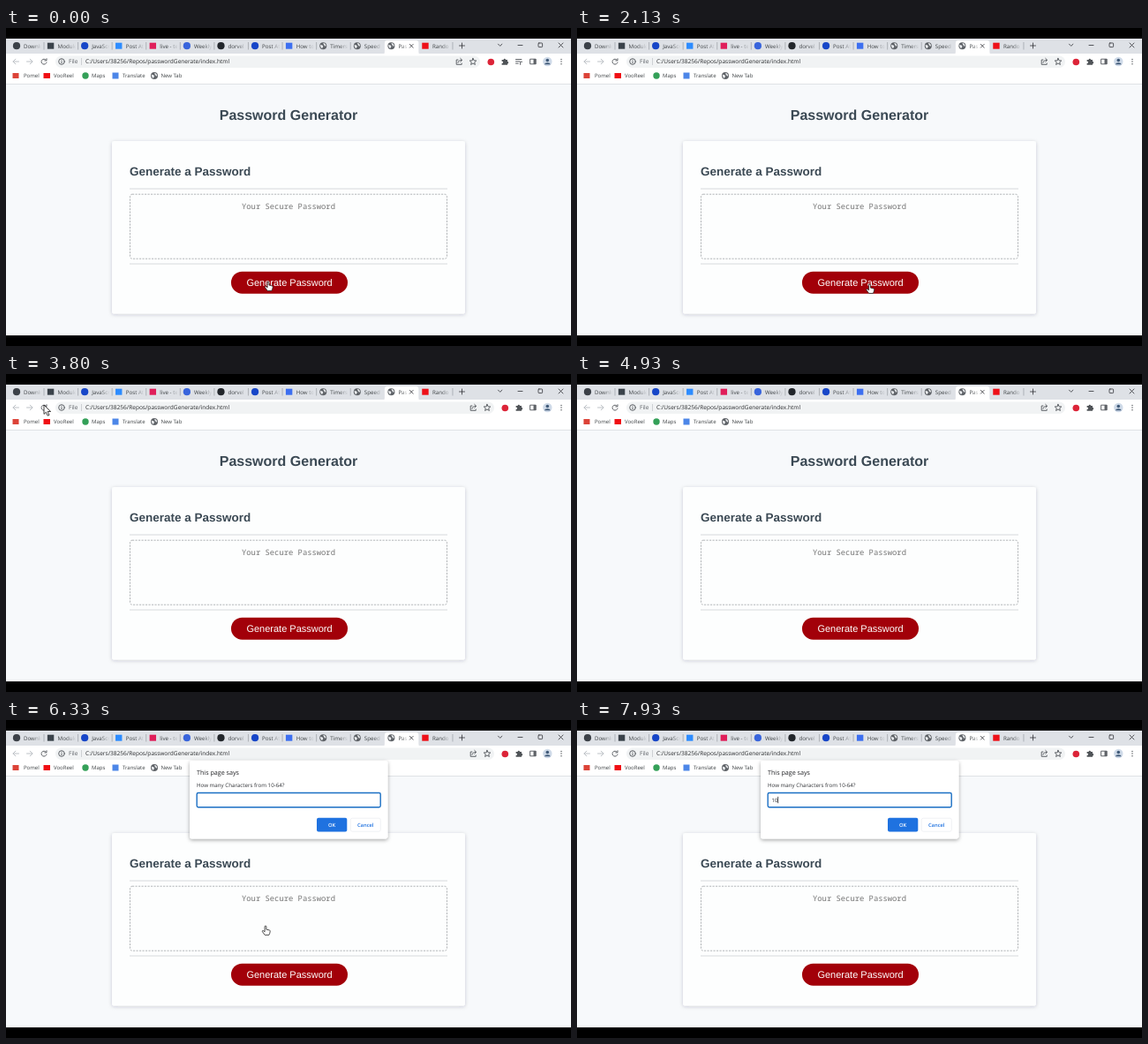
Recreate the animation shown at these times as an HTML page. Size 640 by 360 pixels, loop 8 s.

```html
<!DOCTYPE html>
<html lang="en">
<head>
<meta charset="utf-8">
<title>Password Generator</title>
<style>
  html, body { margin: 0; width: 100%; height: 100%; overflow: hidden; background: #000; }
  svg { display: block; width: 100vw; height: 100vh; }
  text { font-family: "Open Sans", "Noto Sans", sans-serif; font-size: 6.2px; fill: #3c4043; text-rendering: geometricPrecision; }
  .page { font-family: "Liberation Sans", Arial, sans-serif; fill: #3b4954; }
  .bold { font-weight: 700; }
  .mono { font-family: "Noto Sans Mono", monospace; font-size: 8.83px; fill: #757575; }
  .mid { text-anchor: middle; }
  .url { font-size: 6.55px; fill: #2a2c2f; }
  .mark { font-size: 6px; }
  .line { fill: none; stroke: #5f6368; stroke-width: 1; stroke-linecap: round; stroke-linejoin: round; }
  .pale { stroke: #bdc1c6; }
  .dark { stroke: #303236; stroke-width: .8; }
  .rule { stroke: #d6d9dc; }
</style>
</head>
<body>
<svg viewBox="0 0 640 360" preserveAspectRatio="none">
  <defs>
    <linearGradient id="fade">
      <stop offset="0" stop-color="#dee1e6" stop-opacity="0"/>
      <stop offset=".85" stop-color="#dee1e6"/>
    </linearGradient>
    <linearGradient id="fadeWhite">
      <stop offset="0" stop-color="#fff" stop-opacity="0"/>
      <stop offset="1" stop-color="#fff"/>
    </linearGradient>
    <filter id="soft" x="-10%" y="-10%" width="120%" height="125%">
      <feDropShadow dx="0" dy="1" stdDeviation="2" flood-color="#1e2a36" flood-opacity=".2"/>
    </filter>
    <filter id="deep" x="-10%" y="-15%" width="120%" height="140%">
      <feDropShadow dx="0" dy="1.5" stdDeviation="2.2" flood-opacity=".35"/>
    </filter>
    <g id="globe">
      <circle r="4" fill="#5f6368"/>
      <path d="M-3-1.4C-1.8-.2-.3-1 0 .2S-1.2 1.4-.9 3.1C-2.6 2.4-3.4.6-3-1.4M.4-3.1C-.3-1.8 1.2-1.6 1.4-.5S2.4.5 3.2.1C3.2-1.8 1.8-3 .4-3.1" fill="#eceef0"/>
    </g>
  </defs>

  <rect y="12" width="640" height="18" fill="#dee1e6"/>
  <g id="tabs"></g>
  <g class="line dark">
    <path d="M513.5 20h6M516.5 17v6M557.5 18.2l2.2 2.2 2.2-2.2M580 19.5h5M626 17l5 5M631 17l-5 5"/>
    <rect x="603" y="17" width="4.6" height="4.6" rx=".8"/>
  </g>

  <rect y="29" width="640" height="35" fill="#fff"/>
  <rect id="omnibox" x="56" y="31.5" height="13.4" rx="6.7" fill="#f1f3f4"/>
  <path class="line pale" d="M14.5 38H8M10.8 35.2L8 38l2.8 2.8M23.5 38H30M27.2 35.2L30 38l-2.8 2.8"/>
  <path class="line" d="M45.4 36.2A3 3 0 1 0 46 39M46 34.7v2.2h-2.2"/>
  <g class="line" stroke-width=".8">
    <circle cx="63" cy="38" r="3.3"/><path d="M63 37.8v1.8M63 36.2v.1"/>
  </g>
  <text class="url" x="71" y="40.4" style="fill:#5f6368">File</text>
  <path d="M85.5 34v8" stroke="#c4c7cb" stroke-width=".8"/>
  <text class="url" x="90" y="40.4">C:/Users/38256/Repos/passwordGenerate/index.html</text>

  <g id="actions">
    <path class="line" d="M512 36h-1.8v5.3h6V40M512 39.3c.2-2 1.6-3 4-3M514.7 34.4l2 1.9-2 1.9"/>
    <path class="line" d="M529 34.3l1.1 2.5 2.7.2-2.1 1.8.7 2.7-2.4-1.5-2.4 1.5.7-2.7-2.1-1.8 2.7-.2z"/>
    <circle cx="549.3" cy="38.5" r="3.8" fill="#dc2438"/>
    <path d="M561.6 36h2a1.2 1.2 0 1 1 2.4 0h2v2a1.2 1.2 0 1 1 0 2.4v1.4h-6.4v-1.9a1.1 1.1 0 1 0 0-2.1z" fill="#505458"/>
  </g>
  <path id="media" class="line" d="M577.5 35.5h6.4M577.5 37.8h4.4M577.5 40.1h2.8M582.6 41.4v-3.2h2"/>
  <rect class="line" x="594" y="35.2" width="6" height="5.6"/>
  <rect x="597.5" y="35" width="3" height="6" fill="#5f6368"/>
  <circle cx="613.3" cy="38" r="5.2" fill="#cfdae8"/>
  <circle cx="613.3" cy="36.5" r="1.8" fill="#405a78"/>
  <path d="M609.8 41.3a3.6 2.6 0 0 1 7 0" fill="#405a78"/>
  <path d="M629 35.4v.1M629 38v.1M629 40.6v.1" stroke="#505458" stroke-width="1.4" stroke-linecap="round"/>

  <rect x="7.5" y="51" width="7" height="6" fill="#dc4338"/>
  <rect x="42.5" y="51" width="7.5" height="6" fill="#f00f14"/>
  <circle cx="90" cy="54" r="3.7" fill="#34a058"/>
  <rect x="120.5" y="50.5" width="7" height="7" fill="#4c86e8"/>
  <use href="#globe" x="168" y="54"/>
  <text class="mark" x="20" y="56.2">Pomel</text>
  <text class="mark" x="54" y="56.2">VooReel</text>
  <text class="mark" x="97" y="56.2">Maps</text>
  <text class="mark" x="132" y="56.2">Translate</text>
  <text class="mark" x="175.5" y="56.2">New Tab</text>

  <rect y="63" width="640" height="285" fill="#f7f9fb"/>
  <path d="M0 63.5h640" stroke="#dfe2e5"/>
  <text class="page bold mid" x="320" y="104" style="font-size:16px">Password Generator</text>
  <rect x="120" y="128" width="400" height="195.5" rx="2.5" fill="#fdfefe" filter="url(#soft)"/>
  <text class="page bold" x="140" y="166.8" style="font-size:13.5px">Generate a Password</text>
  <path class="rule" d="M140 182h360M140 267h360"/>
  <rect x="140.5" y="188.2" width="359" height="73" rx="2.5" fill="#fdfefe" stroke="#b2b5b8" stroke-dasharray="2.2 1.3"/>
  <text class="mono mid" x="320" y="204.8">Your Secure Password</text>
  <rect x="255" y="275.7" width="132" height="25" rx="12.5" fill="#a20009"/>
  <text class="page mid" x="321" y="292" style="font-size:11px;fill:#fff">Generate Password</text>

  <g id="dialog">
    <rect x="208" y="46" width="224.5" height="88.5" rx="3" fill="#fff" filter="url(#deep)"/>
    <text x="216" y="61.8" style="font-size:7.15px;fill:#202124">This page says</text>
    <text x="216" y="76" style="fill:#303236">How many Characters from 10-64?</text>
    <rect x="216.2" y="82.5" width="208" height="16.2" rx="1.6" fill="#fff" stroke="#1b6fc4" stroke-width="1.4"/>
    <text id="entry" x="220.5" y="92.8" style="font-size:6px;fill:#202124"></text>
    <path id="caret" d="M0 86.8v7.4" stroke="#202124" stroke-width=".8"/>
    <rect x="352" y="110.8" width="34.3" height="15.7" rx="2" fill="#1f72e0"/>
    <text class="mid" x="369.2" y="120.8" style="font-size:5.8px;font-weight:600;fill:#fff">OK</text>
    <rect x="390.3" y="111.2" width="34" height="15" rx="2" fill="#fff" stroke="#eceef1" stroke-width=".8"/>
    <text class="mid" x="407.2" y="120.8" style="font-size:5.8px;font-weight:600;fill:#1f72e0">Cancel</text>
  </g>

  <g id="pointer" stroke-linejoin="round">
    <path id="arrow" d="M0 0v10.4l2.4-2.2 1.8 4 1.8-.8-1.8-3.9h3.4z" fill="#fff" stroke="#111" stroke-width=".8"/>
    <path id="hand" d="M-.9.9C-.9-.3.9-.3.9.9V4.1l3.4.8c.8.3 1 .8.9 1.6L4.7 8.6 3.9 10.4H-.8L-3.6 6.6c-.5-.9.5-1.5 1.3-.9l1.4 1.1z" fill="#fff" stroke="#222" stroke-width=".8"/>
  </g>
</svg>
<script>
const $ = id => document.getElementById(id);
const LOOP = 8000, STEP = 1000 / 15;
const OPEN = 5460, BLINK = 8 * STEP, MEDIA_OFF = 1860;

// title, icon shape, icon colour
const tabs = [
  ["Downlo", "dot", "#3c4148"], ["Module", "box", "#3a424a"], ["JavaScr", "dot", "#1746c8"],
  ["Post At", "box", "#2d8cff"], ["live - te", "box", "#e01e5a"], ["Weekly", "dot", "#3864dc"],
  ["dorvel", "dot", "#22262b"], ["Post At", "dot", "#1746c8"], ["How to", "box", "#3d6ff0"],
  ["Timers", "globe"], ["Speed", "globe"], ["Pass", "globe"], ["Rando", "box", "#ee1018"]
];
const ACTIVE = 11;

function icon(shape, x, color) {
  if (shape === "dot") return `<circle cx="${x}" cy="20.2" r="4.1" fill="${color}"/>`;
  if (shape === "box") return `<rect x="${x - 3.7}" y="16.7" width="7.4" height="7" fill="${color}"/>`;
  return `<use href="#globe" x="${x}" y="20.2"/>`;
}

$("tabs").innerHTML = tabs.map(([title, shape, color], i) => {
  const x = 12 + i * 38.58, on = i === ACTIVE;
  const back = on ? `<path d="M${x - 10} 30q2.5 0 2.5-3V17q0-3 3-3h32.5q3 0 3 3v10q0 3 2.5 3z" fill="#fff"/>` : "";
  const close = on ? `<path class="line dark" d="M${x + 21} 18.4l3.8 3.8M${x + 24.8} 18.4l-3.8 3.8"/>` : "";
  const edge = on || i === ACTIVE - 1 ? "" : `<path d="M${x + 31} 16v8.5" stroke="#9a9ea4" stroke-width=".7"/>`;
  const veil = on
    ? `<rect x="${x + 11}" y="15" width="8.5" height="12" fill="url(#fadeWhite)"/>`
    : `<rect x="${x + 18}" y="15" width="12.5" height="12" fill="url(#fade)"/>`;
  const label = on ? title.slice(0, 3) : title;
  return back + icon(shape, x, color) + `<text x="${x + 8}" y="22.6">${label}</text>` + veil + close + edge;
}).join("");

// time, x, y of the pointer tip
const path = [
  [0, 297, 287], [1050, 297, 287], [1400, 311, 288], [1600, 311, 288],
  [1860, 325, 304], [2130, 331.5, 290], [2860, 331.5, 290], [3660, 43, 36],
  [3800, 43, 35], [4530, 44, 36], [4600, 44, 36], [5130, 294, 286],
  [6270, 294, 286], [6330, 294, 233], [6800, 286, 90], [LOOP, 286, 90]
];

function tip(t) {
  const i = path.findIndex((p, n) => n && t < p[0]);
  const [t0, x0, y0] = path[i - 1], [t1, x1, y1] = path[i];
  const s = (t - t0) / (t1 - t0), e = s * s * (3 - 2 * s);
  return [x0 + (x1 - x0) * e, y0 + (y1 - y0) * e];
}

const inside = (x, y, l, t, r, b) => x >= l && x <= r && y >= t && y <= b;

function pointerKind(x, y, open) {
  if (open) {
    if (inside(x, y, 216, 82, 425, 99)) return "none";
    return inside(x, y, 208, 46, 432, 134) ? "arrow" : "hand";
  }
  if (inside(x, y, 255, 276, 387, 301)) return "hand";
  return inside(x, y, 140, 188, 500, 262) ? "none" : "arrow";
}

const show = (id, on) => $(id).setAttribute("visibility", on ? "visible" : "hidden");

function draw(now) {
  const t = Math.floor((now % LOOP + 7) / STEP) * STEP % LOOP;
  const media = t < MEDIA_OFF, open = t >= OPEN;

  show("media", media);
  $("actions").setAttribute("transform", `translate(${media ? 0 : 16})`);
  $("omnibox").setAttribute("width", media ? 481 : 497);

  const typed = t < 7860 ? "" : t < 7925 ? "1" : "10";
  $("dialog").setAttribute("opacity", open ? Math.min(1, (t - OPEN + 70) / 200) : 0);
  $("entry").textContent = typed;
  const end = 220.8 + (typed ? $("entry").getComputedTextLength() : 0);
  $("caret").setAttribute("transform", `translate(${end})`);
  show("caret", open && (typed || Math.floor((t - OPEN) / BLINK) % 2 === 0));

  const [x, y] = tip(t), kind = pointerKind(x, y, open);
  $("pointer").setAttribute("transform", `translate(${x} ${y})`);
  show("arrow", kind === "arrow");
  show("hand", kind === "hand");
}

const start = performance.now();
function tick() {
  draw(performance.now() - start);
  requestAnimationFrame(tick);
}
tick();
</script>
</body>
</html>
```
